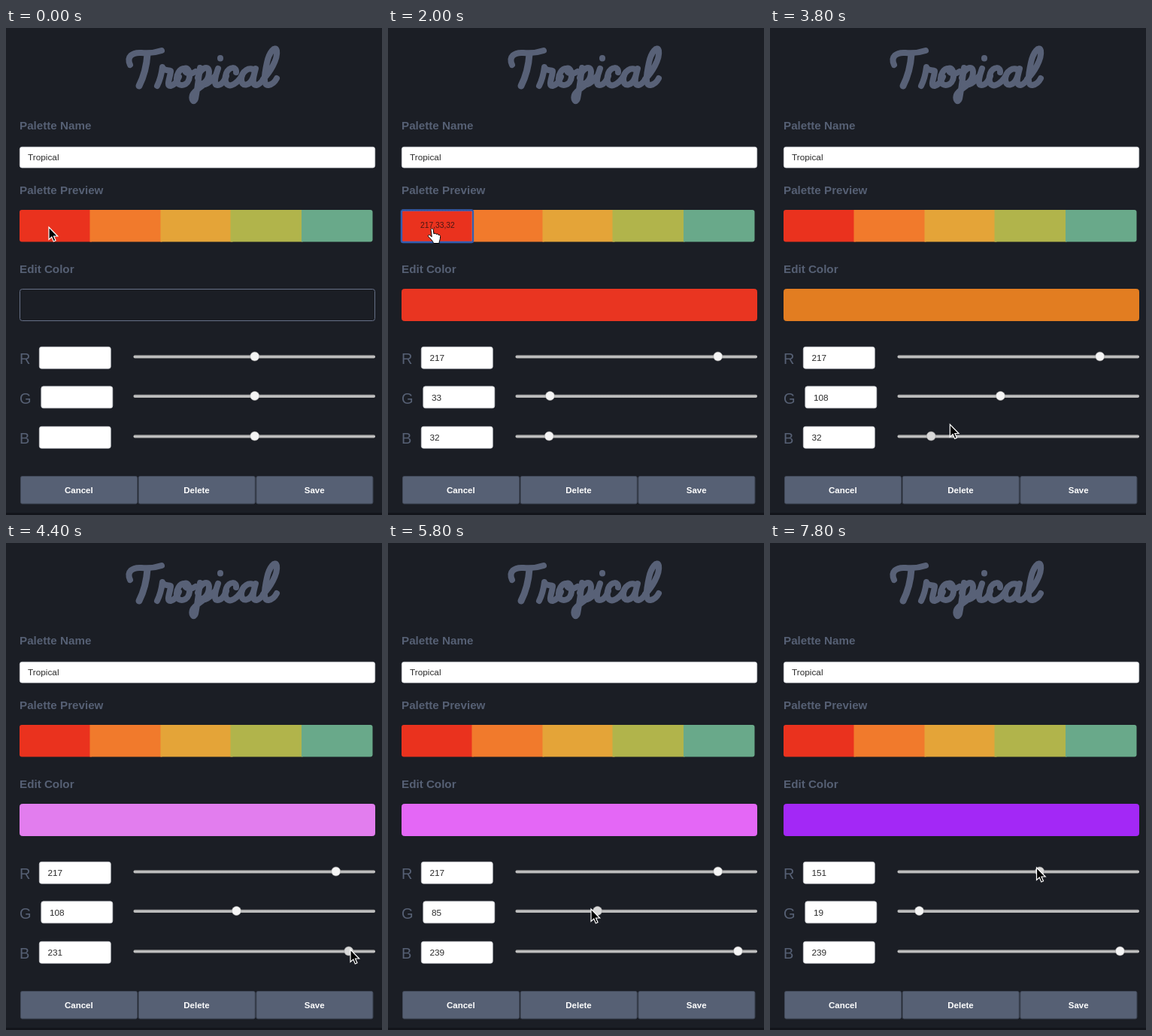
These frames come from a looping animation (500x648 px, 8000 ms). An HTML page:

```html
<!DOCTYPE html>
<html lang="en">
<head>
<meta charset="utf-8">
<title>Palette editor</title>
<style>
  html, body { margin: 0; width: 100%; height: 100%; overflow: hidden; background: #1b1e25; }
  svg { display: block; width: 100%; height: 100%; }
  text { font: 11.8px "Liberation Sans", Arial, sans-serif; fill: #2b2b2b; }
  .label { font-size: 15.2px; font-weight: bold; fill: #566074; }
  .channel { font-size: 20px; fill: #566074; }
  .button { font-size: 11.5px; font-weight: bold; fill: #fff; text-anchor: middle; }
  .hint { font-size: 10.3px; fill: #4a1713; }
  .lettering { fill: none; stroke: #586177; stroke-width: 8; stroke-linecap: round; stroke-linejoin: round; }
  .field { fill: #fff; stroke: #c9ccd2; stroke-width: .7; }
</style>
</head>
<body>
<svg viewBox="0 0 500 648">
  <defs>
    <linearGradient id="rail" x2="0" y2="1">
      <stop offset="0" stop-color="#8b8b8b"/>
      <stop offset=".5" stop-color="#c9c9c9"/>
      <stop offset="1" stop-color="#a9a9a9"/>
    </linearGradient>
    <clipPath id="strip"><rect x="18" y="242" width="469.5" height="42.5" rx="3"/></clipPath>
  </defs>
  <rect width="500" height="648" fill="#1b1e25"/>
  <rect y="645" width="500" height="3" fill="#13151b"/>

  <g class="lettering" role="img" aria-label="Tropical">
    <path d="M165 49C160 38 168 32 180 33C190 34 198 33 207 30"/>
    <path d="M188 35C187 51 183 65 177 77" stroke-width="9"/>
    <path d="M201 77C205 69 207 60 208 52C210 58 216 55 219 57C219 64 212 78 219 77C224 76 228 70 230 65"/>
    <path d="M240 54C230 52 226 64 227 70C229 80 243 77 244 65C245 57 241 52 237 54C238 62 246 62 252 58"/>
    <path d="M258 53C256 68 254 84 252 94C250 101 246 95 248 89C251 82 262 78 268 70"/>
    <path d="M255 66C258 54 269 48 270 58C270 68 264 76 257 74C264 78 272 72 277 65"/>
    <path d="M282 54C279 62 275 76 281 76C287 76 291 69 293 64M285 40v.5"/>
    <path d="M306 59C307 51 297 51 293 60C289 72 294 78 300 76C306 74 311 68 314 63"/>
    <path d="M331 57C324 50 313 58 313 68C313 79 324 78 329 65L332 54C329 65 326 76 333 76C339 75 344 66 347 59"/>
    <path d="M342 68C350 60 362 42 360 30C358 23 350 32 347 46C343 64 342 77 349 76C355 75 358 71 360 67"/>
  </g>

  <text class="label" x="18" y="135">Palette Name</text>
  <rect class="field" x="18.3" y="158.3" width="472.4" height="27.7" rx="3"/>
  <text x="29" y="176.3">Tropical</text>
  <text class="label" x="18" y="220.5">Palette Preview</text>
  <g id="swatches" clip-path="url(#strip)"></g>
  <g id="focus" fill="none">
    <rect x="18" y="242.5" width="95" height="42.5" rx="2" stroke="#3a6bc9" stroke-width="2.4"/>
    <rect x="18" y="242.5" width="95" height="42.5" stroke="#1d3566" stroke-dasharray="1 1"/>
  </g>
  <text class="hint" id="hint" x="43" y="266">217,33,32</text>
  <text class="label" x="18" y="326">Edit Color</text>
  <rect id="mix" x="18.5" y="347.5" width="472" height="42" rx="3"/>
  <g id="channels"></g>
  <g id="buttons"></g>
  <path id="arrow" d="M0 0V16.5L3.8 13L6.3 19L9 17.8L6.5 12H11.7Z" fill="#000" stroke="#fff" stroke-width="1.2"/>
  <path id="hand" d="M0 1.5C0-.7 3-.7 3.2 1.5L4 7C5 5.800 7 6.200 7.200 7.500C8.200 6.500 10 7 10.200 8.500C11.500 7.800 12.700 8.800 12.600 10.500C12.600 15 11 16 11 19.500H3.500C3 16.500-1 13-3.300 10.500C-4.500 8.800-2.500 7.500-.800 9L1.200 10.800Z" fill="#fff" stroke="#000"/>
</svg>
<script>
  const LOOP = 8000, STEP = 200;
  const PICK = 600, BLUR = 2600;
  const $ = id => document.getElementById(id);
  const sliderX = value => 175.4 + 1.2136 * value;

  $('swatches').innerHTML = [
    [18, '#ea321e'], [111.5, '#f17a2c'], [205.5, '#e4a438'], [298.5, '#b1b44b'], [393, '#69a98a']
  ].map(([x, color]) => `<rect x="${x}" y="242" width="96" height="43" fill="${color}"/>`).join('');

  $('buttons').innerHTML = ['Cancel', 'Delete', 'Save'].map((name, i) => {
    const x = 19.5 + 156.7 * i;
    return `<rect x="${x}" y="596.5" width="155" height="36.5" rx="2" fill="#566074" stroke="#414959"/>
      <text class="button" x="${x + 77.3}" y="618.5">${name}</text>`;
  }).join('');

  // Keys are [time, value]
  const channels = [
    { name: 'R', x: 44, y: 437, keys: [[0, 217], [7000, 217], [7800, 151]] },
    { name: 'G', x: 46.5, y: 489.5, keys: [[0, 33], [2800, 33], [3600, 108], [5400, 108], [5800, 85], [6400, 23], [6800, 23], [7000, 19]] },
    { name: 'B', x: 44, y: 543, keys: [[0, 32], [3900, 32], [4400, 231], [4600, 239]] }
  ];
  const cursorX = [[0, 57], [2000, 57], [2800, 214], [3600, 306], [3900, 216], [4400, 458], [4600, 467], [5400, 302], [5800, 270], [6400, 200], [6800, 448.5], [7000, 439], [7800, 354.5]];
  const cursorY = [[0, 265], [2000, 267], [2800, 488], [3600, 489], [3900, 541], [4600, 541], [5400, 487], [6400, 487], [6800, 414], [7000, 432], [7800, 432]];
  const presses = [[2800, 'G'], [3800, 'B'], [5200, 'G'], [7000, 'R']];

  $('channels').innerHTML = channels.map(({ name, x, y }) => `
    <text class="channel" x="18" y="${y + 10}">${name}</text>
    <rect class="field" x="${x + .3}" y="${y - 12.7}" width="95" height="29" rx="3"/>
    <text id="value${name}" x="${x + 11.5}" y="${y + 6.3}"></text>
    <rect x="169.500" y="${y - 1.7}" width="321.500" height="4.200" rx="2" fill="url(#rail)"/>
    <circle id="thumb${name}" cy="${y}" r="6" stroke="#a0a0a0" stroke-width=".6"/>`).join('');

  function at(keys, t) {
    const next = keys.findIndex(([time]) => time > t);
    if (next < 0) return keys[keys.length - 1][1];
    const [t0, a] = keys[next - 1], [t1, b] = keys[next];
    const p = (t - t0) / (t1 - t0);
    return a + (b - a) * p * p * (3 - 2 * p);
  }

  // Display-profile shift of the mixed colour
  function screenColor([r, g, b]) {
    return `rgb(${r * 1.08 - (g - 20) * .1}, ${g * .95 + 22}, ${b * 1.03})`;
  }

  function draw(t) {
    const picked = t >= PICK;
    const values = channels.map(c => Math.round(at(c.keys, t)));
    const pressed = presses.filter(([time]) => time <= t).pop();

    channels.forEach(({ name }, i) => {
      $('value' + name).textContent = picked ? values[i] : '';
      const thumb = $('thumb' + name);
      thumb.setAttribute('cx', sliderX(picked ? values[i] : 128));
      thumb.setAttribute('fill', pressed && pressed[1] === name ? '#d9d9d9' : '#f5f5f5');
    });
    $('mix').setAttribute('fill', picked ? screenColor(values) : 'none');
    $('mix').setAttribute('stroke', picked ? screenColor(values) : '#667087');

    const x = at(cursorX, t), y = at(cursorY, t);
    const hover = picked && x < 112 && y < 285;
    const show = (id, on) => $(id).setAttribute('visibility', on ? 'visible' : 'hidden');
    show('focus', picked && t < BLUR);
    show('hint', hover);
    show('hand', hover);
    show('arrow', !hover);
    for (const id of ['arrow', 'hand']) $(id).setAttribute('transform', `translate(${x} ${y})`);
  }

  const start = performance.now();
  function frame() {
    const t = (performance.now() - start) % LOOP;
    draw(Math.floor(t / STEP) * STEP);
    requestAnimationFrame(frame);
  }
  frame();
</script>
</body>
</html>
```
